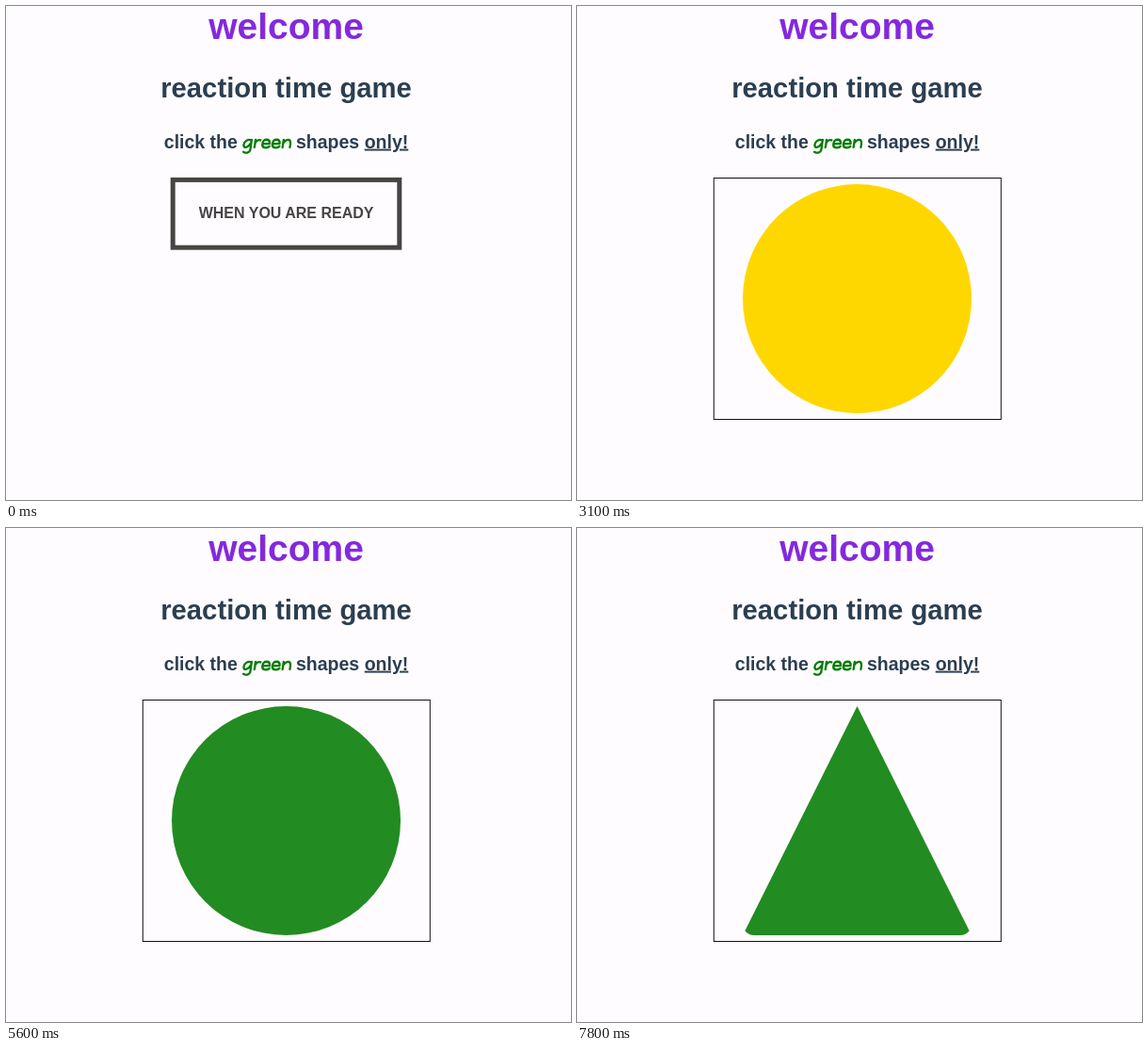
An HTML page that plays this animation: 600x524 px, repeating every 8000 ms.

```html
<!DOCTYPE html>
<html lang="en">
<head>
<meta charset="utf-8">
<title>Reaction time game</title>
<style>
  html, body { margin: 0; width: 100%; height: 100%; overflow: hidden; background: #fefcff; }
  svg { display: block; width: 100%; height: 100%; }
  text { font-family: "Liberation Sans", Arial, sans-serif; font-weight: bold; fill: #2c3e50; }
  .mid { text-anchor: middle; }
  .big { font-size: 39px; }
  .sub { font-size: 29.25px; }
  .hint { font-size: 19.5px; }
  .welcome { fill: #8429de; }
  .only { text-decoration: underline; }
  .script { fill: none; stroke: #007d00; stroke-width: 2.3; stroke-linecap: round; stroke-linejoin: round; }
  #label { font-size: 16px; }
</style>
</head>
<body>
<svg viewBox="0 0 600 524">
  <text class="mid big welcome" x="297.5" y="35">welcome</text>
  <text class="mid sub" x="297.5" y="96.5">reaction time game</text>
  <text class="hint" x="167.8" y="150.6">click the</text>
  <!-- handwritten word, drawn as pen strokes -->
  <g class="script" role="img" aria-label="green" transform="translate(250.3 151.2) skewX(-8)">
    <path d="M8.8 -8.7C5.5 -10.4 1.6 -7.8 1.6 -4.2C1.6 0 6.8 -.4 8.9 -6M9.3 -9.2V.8C9.3 5 4.6 5.2 2.2 3.4"/>
    <path d="M13.4 -9.3V-1.1M13.4 -5.6C14.6 -8.6 16.6 -9.8 18.8 -8.8"/>
    <g id="e"><path d="M21.7 -5H29C28.8 -10.9 21.4 -11 21.3 -5C21.3 -.2 26.4 -.2 29.2 -2.2"/></g>
    <use href="#e" x="10.6"/>
    <path d="M43.2 -9.3V-1.1M43.2 -5.4C45 -10 50.8 -11.4 51 -5V-1.1"/>
  </g>
  <text class="hint" x="308" y="150.6">shapes</text>
  <text class="hint only" x="380.7" y="150.6">only!</text>

  <g id="button">
    <rect id="frame" x="177.2" y="184.4" width="240.6" height="71.8" stroke-width="5"/>
    <text id="label" class="mid" x="297.6" y="225.2">WHEN YOU ARE READY</text>
  </g>

  <g id="board">
    <rect x="145.3" y="182.5" width="305" height="256" fill="none" stroke="#111"/>
    <path id="shape"/>
  </g>
  <text id="praise" class="mid big" x="297.5" y="501">good job</text>
</svg>
<script>
const LOOP = 8000;
const HOVER = 1900, FADE = 400, START = 3100;
const PRAISE_ON = 6000, PRAISE_OFF = 7000;

const BLUE = '#4169e1', GOLD = '#ffd700', GREEN = '#228b22';
const paths = {
  rect: 'M164 207H431A12 12 0 0 1 443 219V389A12 12 0 0 1 431 401H164A12 12 0 0 1 152 389V219A12 12 0 0 1 164 207Z',
  circle: 'M176 310.5A121.5 121.5 0 0 1 419 310.5A121.5 121.5 0 0 1 176 310.5Z',
  triangle: 'M297.5 189L178.4 427.2A12 12 0 0 0 188 432H407A12 12 0 0 0 416.6 427.2Z'
};
const rounds = [
  [START, 'circle', GOLD],
  [3600, 'rect', BLUE],
  [4100, 'rect', GOLD],
  [5100, 'circle', BLUE],
  [5600, 'circle', GREEN],
  [6600, 'triangle', GOLD],
  [7500, 'triangle', GREEN]
];

const el = id => document.getElementById(id);
const [button, frame, label, board, shape, praise] =
  ['button', 'frame', 'label', 'board', 'shape', 'praise'].map(el);
const show = (node, on) => node.setAttribute('visibility', on ? 'visible' : 'hidden');
const mix = (a, b, k) => `rgb(${a.map((v, i) => Math.round(v + (b[i] - v) * k))})`;
const ease = k => k * k * (3 - 2 * k);

const PAPER = [254, 252, 255], INK = [71, 69, 68], AMBER = [244, 183, 59], WHITE = [255, 255, 255];

function draw(t) {
  const k = ease(Math.min(1, Math.max(0, (t - HOVER) / FADE)));
  frame.setAttribute('fill', mix(PAPER, AMBER, k));
  frame.setAttribute('stroke', mix(INK, AMBER, k));
  label.style.fill = mix(INK, WHITE, k);

  const playing = t >= START;
  show(button, !playing);
  show(board, playing);
  show(praise, t >= PRAISE_ON && t < PRAISE_OFF);

  if (playing) {
    const [, kind, color] = rounds.filter(r => t >= r[0]).pop();
    shape.setAttribute('d', paths[kind]);
    shape.setAttribute('fill', color);
  }
}

const begin = performance.now();
function tick() {
  draw((performance.now() - begin) % LOOP);
  requestAnimationFrame(tick);
}
tick();
</script>
</body>
</html>
```
